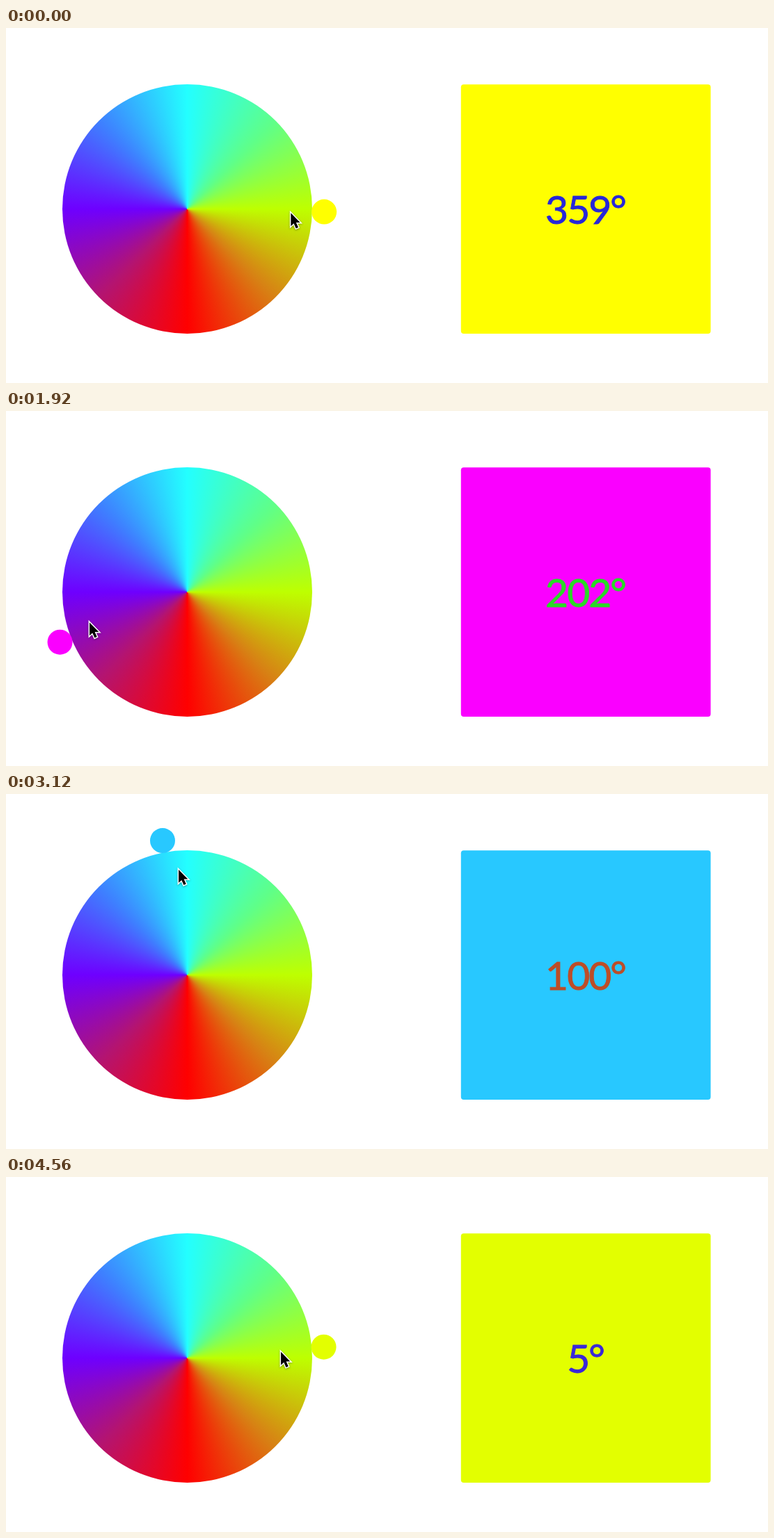
Write an HTML page with a canvas that moves like this. It is 1095 by 511 pixels and loops after 4640 ms.

```html
<!DOCTYPE html>
<html lang="en">
<head>
<meta charset="utf-8">
<title>Colour wheel</title>
<style>
  html, body { margin: 0; width: 100%; height: 100%; overflow: hidden; background: #fff; }
  canvas { display: block; }
</style>
</head>
<body>
<canvas id="stage" width="1095" height="511"></canvas>
<script>
const ctx = document.getElementById('stage').getContext('2d');
const LOOP = 4640, STEP = 80;
const CENTER = 260.5, RADIUS = 179.5, ORBIT = 196.7, KNOB = 18;
const RADIANS = Math.PI / 180;

// The drag: knob angle, then how far the pointer lags and its distance from the centre.
const drag = [
  { time: 0, angle: 358.8, lag: 0.7, reach: 148 },
  { time: 800, angle: 308.6, lag: 4, reach: 133 },
  { time: 1120, angle: 260, lag: 4.5, reach: 136 },
  { time: 1440, angle: 232, lag: 4.8, reach: 139 },
  { time: 2400, angle: 169.3, lag: 4.5, reach: 155 },
  { time: 3120, angle: 100.4, lag: 5.4, reach: 153 },
  { time: 3680, angle: 66.8, lag: 0.9, reach: 143 },
  { time: 4560, angle: 4.6, lag: 0.5, reach: 134 },
];

// Hue turns unevenly with the angle.
const hueStops = [[0, 61], [67, 142], [100, 195], [232, 330], [309, 383], [360, 421]];

// Cubic through the drag points, with slopes taken from the neighbours.
function smooth(name, time) {
  const last = drag.length - 1;
  let i = 0;
  while (i < last - 1 && time > drag[i + 1].time) i++;
  const span = drag[i + 1].time - drag[i].time;
  const slope = k => {
    const a = drag[Math.max(k - 1, 0)], b = drag[Math.min(k + 1, last)];
    return (b[name] - a[name]) / (b.time - a.time) * span;
  };
  const u = (time - drag[i].time) / span, v = 1 - u;
  return v * v * (1 + 2 * u) * drag[i][name] + u * u * (1 + 2 * v) * drag[i + 1][name]
    + u * v * v * slope(i) - u * u * v * slope(i + 1);
}

function hueAt(angle) {
  const i = hueStops.findIndex(stop => stop[0] >= angle);
  const [a, from] = hueStops[i - 1], [b, to] = hueStops[i];
  return from + (to - from) * (angle - a) / (b - a);
}

// Full saturation, slightly lighter around cyan.
function colorAt(angle) {
  const hue = hueAt(angle);
  const light = 0.5 + 0.08 * Math.max(0, Math.cos((angle - 95) * RADIANS)) ** 4;
  return [0, 8, 4].map(n => {
    const k = (n + hue / 30) % 12;
    return 255 * (light - (1 - light) * Math.max(-1, Math.min(k - 3, 9 - k, 1)));
  });
}

const css = rgb => `rgb(${rgb.map(Math.round)})`;
const contrast = rgb => rgb.map(c => 217 - 0.7 * c);

function onCircle(radius, degrees) {
  const a = degrees * RADIANS;
  return [CENTER + radius * Math.cos(a), CENTER - radius * Math.sin(a)];
}

function disc(x, y, r, fill) {
  ctx.fillStyle = fill;
  ctx.beginPath();
  ctx.arc(x, y, r, 0, Math.PI * 2);
  ctx.fill();
}

const wheelFill = ctx.createConicGradient(0, CENTER, CENTER);
['#beff00', '#d78214', '#ff0000', '#b41470', '#6e00ff', '#3e80ff', '#23ffff', '#5fff88', '#beff00']
  .forEach((color, i) => wheelFill.addColorStop(i / 8, color));

const arrow = new Path2D('M1 1V21.5L5.6 17.2L9 25L12.6 23.4L9.2 15.8H15.4Z');

function drawPointer(x, y) {
  ctx.save();
  ctx.translate(x, y);
  ctx.scale(0.92, 0.92);
  ctx.lineWidth = 3.2;
  ctx.strokeStyle = '#fff';
  ctx.shadowColor = 'rgba(0,0,0,.35)';
  ctx.shadowBlur = 3;
  ctx.shadowOffsetY = 1;
  ctx.stroke(arrow);
  ctx.shadowColor = 'transparent';
  ctx.fillStyle = '#000';
  ctx.fill(arrow);
  ctx.restore();
}

function drawLabel(text, color) {
  ctx.font = '57px Lato, sans-serif';
  ctx.letterSpacing = '-2px';
  ctx.textAlign = 'center';
  ctx.fillStyle = ctx.strokeStyle = color;
  ctx.lineWidth = 0.9;
  ctx.fillText(text, 832.5, 282);
  ctx.strokeText(text, 832.5, 282);
}

function draw(time) {
  const angle = smooth('angle', time);
  const color = colorAt(angle);
  ctx.fillStyle = '#fff';
  ctx.fillRect(0, 0, 1095, 511);

  disc(CENTER, CENTER, RADIUS, wheelFill);
  disc(...onCircle(ORBIT, angle), KNOB, css(color));

  ctx.fillStyle = css(color);
  ctx.beginPath();
  ctx.roundRect(653.8, 81.2, 358.8, 358.8, 4);
  ctx.fill();

  drawLabel(Math.round(angle) + '°', css(contrast(color)));
  drawPointer(...onCircle(smooth('reach', time), angle - smooth('lag', time)));
}

const start = performance.now();
function tick() {
  const time = (performance.now() - start) % LOOP;
  draw(Math.floor(time / STEP) * STEP);
  requestAnimationFrame(tick);
}
tick();
</script>
</body>
</html>
```
